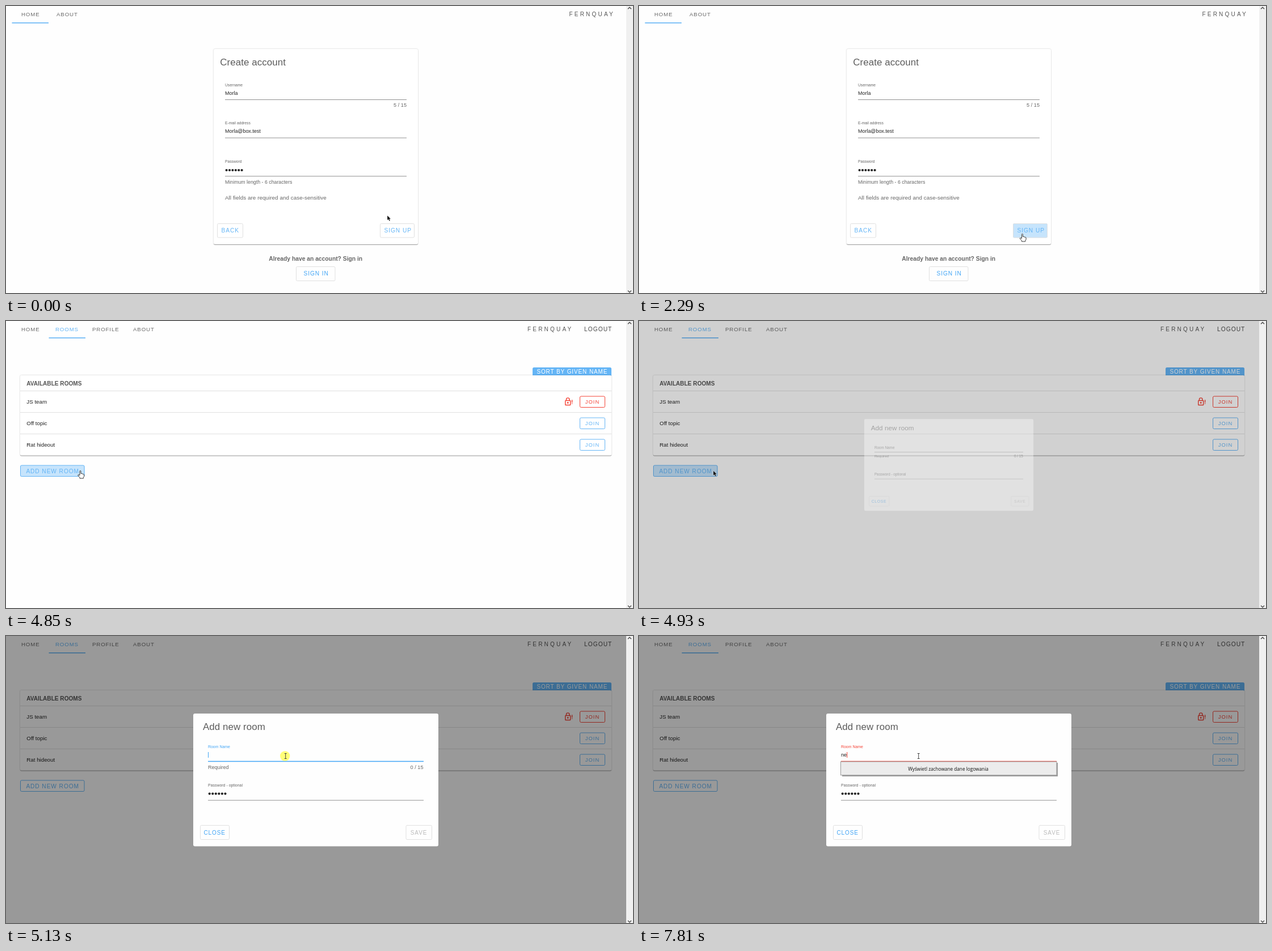
Recreate the animation shown at these times as an HTML page. Size 1105 px wide and 507 px high, loop 8000 ms.

```html
<!DOCTYPE html>
<html lang="en">
<head>
<meta charset="utf-8">
<title>Rooms demo</title>
<style>
  html, body { margin: 0; width: 100%; height: 100%; overflow: hidden; background: #fefefe; }
  svg { display: block; width: 1105px; height: 507px; font-family: "Liberation Sans", Arial, sans-serif; }
  text { white-space: pre; }
  .card { fill: #fff; filter: drop-shadow(0 1.2px .4px rgba(0,0,0,.3)) drop-shadow(0 .4px 1.2px rgba(0,0,0,.22)); }
</style>
</head>
<body>
<svg id="stage" viewBox="0 0 1105 507"></svg>
<script>
const LOOP = 8000;
const BLUE = '#64b5f6', DEEP = '#42a5f5', RED = '#f44336', GREY = '#666', EDGE = '#e0e0e0';
const stage = document.getElementById('stage');
const $ = id => document.getElementById(id);

// Markup helpers
const text = (x, y, str, size, fill = GREY, spacing = 0, extra = '') =>
  `<text x="${x}" y="${y}" font-size="${size}" fill="${fill}" letter-spacing="${spacing}" ${extra}>${str}</text>`;
const rect = (x, y, w, h, attrs) => `<rect x="${x}" y="${y}" width="${w}" height="${h}" ${attrs}/>`;
const rule = (x1, x2, y, color = '#919191', extra = '') =>
  `<path d="M${x1} ${y}H${x2}" stroke="${color}" ${extra}/>`;
const dots = (x, y, gap) => Array.from({ length: 6 }, (_, i) =>
  `<circle cx="${x + i * gap}" cy="${y}" r="2.1" fill="#222"/>`).join('');
const button = (x, y, w, h, label, tx, ty, color, edge = EDGE, size = 10.2, spacing = .91) =>
  rect(x + .5, y + .5, w - 1, h - 1, `rx="2" fill="none" stroke="${edge}"`) +
  text(tx, ty, label, size, color, spacing);
const ripple = (id, x, y, w, h, cx, cy) =>
  `<clipPath id="${id}Clip">${rect(x, y, w, h, 'rx="2.5"')}</clipPath>
   <g clip-path="url(#${id}Clip)"><circle id="${id}" cx="${cx}" cy="${cy}" r="0" fill="${BLUE}"/></g>`;
const tab = (x, label, id = '') => text(x, 18, label, 9.7, '#6c6c6c', .86, id && `id="${id}"`);
const brand = x => text(x, 18, 'FERNQUAY', 10, '#555', 3.2);

const nav = `
  ${tab(27, 'HOME')}
  <g id="guestNav">${tab(89, 'ABOUT')}${brand(992.5)}</g>
  <g id="memberNav">
    ${tab(87, 'ROOMS', 'roomsTab')}${tab(152, 'PROFILE')}${tab(224, 'ABOUT')}${brand(919)}
    ${text(1019, 18, 'LOGOUT', 10.2, '#484848', 1.05)}
  </g>
  ${rect(10.5, 29, 64.5, 1.6, `id="slider" fill="${BLUE}"`)}`;

const register = `<g id="register">
  ${rect(366, 76, 360, 345, 'rx="2.5" class="card"')}
  ${text(377.3, 105, 'Create account', 16.9, '#5c5c5c', .08)}
  ${text(386, 142, 'Username', 6.72)}
  ${text(386, 157, 'Morla', 8.95, '#222')}
  ${rule(386, 706, 165.5)}
  ${text(683, 178.3, '5 / 15', 9.2)}
  ${text(386, 209.2, 'E-mail address', 6.72)}
  ${text(386, 224.3, 'Morla@box.test', 8.95, '#222')}
  ${rule(386, 706, 233)}
  ${text(386, 277.2, 'Password', 6.72)}
  ${dots(388.6, 290, 5.4)}
  ${rule(386, 706, 300.7)}
  ${text(386, 313.6, 'Minimum length - 6 characters', 8.8)}
  ${text(386, 341.8, 'All fields are required and case-sensitive', 9.8, GREY, .07)}
  ${ripple('signUpRipple', 659, 384, 61, 25.5, 675.5, 403)}
  ${button(372, 384, 46, 25.5, 'BACK', 379.6, 400.3, BLUE)}
  ${button(659, 384, 61, 25.5, 'SIGN UP', 666.6, 400.3, BLUE)}
  ${text(463.3, 449.6, 'Already have an account? Sign in', 10.3, GREY, 0, 'font-weight="bold"')}
  ${button(511, 460, 69.5, 26, 'SIGN IN', 524.5, 476.2, DEEP)}
</g>`;

const roomRow = (y, name, color) =>
  rule(25, 1067, y, EDGE) + text(36.3, y + 22.4, name, 9.75, '#222') +
  button(1011, y + 9, 45, 20.5, 'JOIN', 1020.8, y + 22.8, color, color, 9.4, 1);
const lock = `<g fill="none" stroke="${RED}" stroke-width="1.4">
  <rect x="985.7" y="140.5" width="9" height="8" rx=".8"/>
  <path d="M987.4 140V138.7a2.8 2.8 0 0 1 5.6 0V140M997.6 139.2V144.2M997.6 145.2V146.6"/>
  <circle cx="990.2" cy="144.5" r=".7"/></g>`;
const rooms = `<g id="rooms">
  ${rect(928, 82, 139, 16, `rx="2.5" fill="${BLUE}"`)}
  ${text(935.4, 93.2, 'SORT BY GIVEN NAME', 10, '#fff', .89)}
  ${rect(25, 96, 1042, 141.5, 'rx="2" class="card"')}
  ${text(36.3, 113.6, 'AVAILABLE ROOMS', 10.1, '#555', 0, 'font-weight="bold"')}
  ${roomRow(123.5, 'JS team', RED)}${lock}
  ${roomRow(161.5, 'Off topic', BLUE)}
  ${roomRow(199.5, 'Rat hideout', BLUE)}
  ${ripple('addRipple', 25, 255, 113.5, 20, 131, 264)}
  ${button(25, 254.5, 113.5, 20.5, 'ADD NEW ROOM', 35.4, 268.7, BLUE, BLUE)}
</g>`;

const dialog = `<g id="dialog">
  ${rect(330, 137, 432, 234.5, 'rx="3" fill="#fefefe"')}
  ${text(347, 165.8, 'Add new room', 16.9, '#5c5c5c', .08)}
  ${text(356, 198, 'Room Name', 6.95, GREY, 0, 'id="nameLabel"')}
  ${text(356, 213.4, '', 9.2, '#222', 0, 'id="nameValue"')}
  ${rect(356, 205, 1, 10, 'id="caret"')}
  ${rule(356, 736, 221.5, GREY, 'id="nameLine"')}
  ${text(356, 235.2, 'Required', 9)}
  ${text(712.6, 235.2, '0 / 15', 9.2)}
  ${text(356, 266.3, 'Password - optional', 6.95, GREY, 0, 'id="passLabel"')}
  <g id="passDots">${dots(358.7, 278.6, 5.55)}</g>
  ${rule(356, 736, 290.2)}
  ${button(342, 334, 52, 26, 'CLOSE', 348.4, 350.6, DEEP, EDGE, 10, .9)}
  ${button(704.5, 334, 46.5, 26, 'SAVE', 712.8, 350.6, '#bbb', EDGE, 10, .9)}
  <g id="popup">
    ${rect(358, 224, 380, 24, 'fill="#999"')}
    ${rect(355.5, 222, 380.5, 23.8, 'fill="#ececec" stroke="#9a9a9a"')}
    <text x="545" y="238" font-size="8.25" text-anchor="middle" fill="#111"
      font-family="Open Sans, Noto Sans, sans-serif">Wyświetl zachowane dane logowania</text>
  </g>
</g>`;

const scrollbar = rect(1093, 0, 12, 507, 'fill="#f0f0f0"') +
  `<path d="M1096 5.3L1099 2.3L1102 5.3M1096 502.7L1099 505.7L1102 502.7" fill="none" stroke="#505050" stroke-width="1.5"/>`;

const pointer = `<g id="pointer">
  <path id="arrow" d="M0 0V8.6L2 6.8L3.5 10L5 9.3L3.6 6.2H6.2Z" stroke="#fff" stroke-width=".4"/>
  <path id="hand" d="M-1 8V1Q-1 0 0 0Q1 0 1 1V5Q3 4.4 3.2 5.6Q5 5 5.2 6.2Q6.6 6 6.6 7.3V10L5.4 12V13.5H-1V12L-4 8.6Q-4.6 7 -3 7.2Z"
    fill="#fff" stroke="#222" stroke-width=".9" stroke-linejoin="round"/>
  <g id="beam"><circle id="press" cx="-1" r="8.7" fill="#ffff78"/>
    <path d="M-2 -4.5H2M0 -4.5V4.5M-2 4.5H2" fill="none" stroke="#444"/></g>
</g>`;

stage.innerHTML = rect(0, 0, 1105, 507, 'fill="#fefefe"') + nav + register + rooms +
  rect(0, 0, 1093, 507, 'id="dim"') + dialog + scrollbar + pointer;

// Timing helpers
const clamp = v => Math.max(0, Math.min(1, v));
const span = (t, a, b) => clamp((t - a) / (b - a));
const ease = p => p * p * (3 - 2 * p);
const lerp = (a, b, p) => a + (b - a) * p;
const mix = (a, b, p) => `rgb(${a.map((v, i) => Math.round(lerp(v, b[i], p)))})`;
const set = (id, attrs) => { for (const k in attrs) $(id).setAttribute(k, attrs[k]); };
const show = (id, on) => { $(id).style.display = on ? '' : 'none'; };

const path = [ // time, x, y
  [0, 672, 370], [90, 672, 370], [250, 698, 411], [390, 698, 410], [600, 692, 394],
  [800, 679.5, 397.5], [1110, 679.5, 397.5], [1180, 675.5, 402.5], [2380, 675.5, 402.5],
  [2680, 541, 373], [2780, 541, 373], [2990, 530, 388], [3240, 530, 388], [3690, 472, 279],
  [4080, 776, 183], [4470, 131, 264.5], [5130, 131, 264.5]
];
function pointerAt(t) {
  if (t >= 5130) return [492.7, 212];
  const i = path.findIndex(p => p[0] > t);
  const [a, b] = [path[i - 1], path[i]], p = ease(span(t, a[0], b[0]));
  return [lerp(a[1], b[1], p), lerp(a[2], b[2], p)];
}
const inside = ([px, py], x, y, w, h) => px >= x && px <= x + w && py >= y && py <= y + h;

// Dialog opens in three hard stages.
function dialogStage(t) {
  if (t < 4930) return { open: 0, dim: 0, float: 0 };
  if (t < 5030) return { open: .38, dim: .45, float: 0 };
  if (t < 5130) return { open: .83, dim: .8, float: .43 };
  return { open: 1, dim: 1, float: 1 };
}

function drawDialog(t) {
  const { open, dim, float } = dialogStage(t);
  const scale = .5 + .5 * open;
  show('dim', dim > 0);
  show('dialog', open > 0);
  set('dim', { opacity: dim * .4 });
  set('dialog', { opacity: open, transform: `translate(546 254.3) scale(${scale}) translate(-546 -254.3)` });

  const size = lerp(9.2, 6.95, float), error = span(t, 6780, 7020);
  const accent = error ? mix([66, 165, 245], [244, 67, 54], error) : mix([102, 102, 102], [66, 165, 245], float);
  set('nameLabel', { y: lerp(212.8, 198, float), 'font-size': size, fill: accent });
  set('passLabel', { y: lerp(281, 266.3, float), 'font-size': size });
  set('nameLine', { stroke: float < 1 ? '#777' : accent, 'stroke-width': float < 1 ? 1 : 1.5 });
  show('passDots', float > 0);

  const typed = t < 6780 ? '' : t < 7290 ? 'n' : 'ne';
  if ($('nameValue').textContent !== typed) $('nameValue').textContent = typed;
  set('caret', { x: 356 + typed.length * 5.1, fill: accent });
  show('caret', float > 0 && !(t >= 5670 && t < 6220) && !(t >= 7400 && t < 7810));
  show('popup', t >= 6780);
}

function drawPointer(t) {
  const pos = pointerAt(t), typing = t >= 5130;
  const overButton = t < 3240 ? inside(pos, 659, 384, 61, 25.5) : t < 4930 && inside(pos, 25, 255, 113, 20);
  set('pointer', { transform: `translate(${pos})` });
  show('beam', typing);
  show('hand', overButton && !typing);
  show('arrow', !overButton && !typing);
  show('press', t < 5290);
}

function draw(t) {
  const signedUp = t >= 2780, inRooms = t >= 3240;
  show('guestNav', !signedUp);
  show('memberNav', signedUp);
  show('register', !inRooms);
  show('rooms', inRooms);
  set('roomsTab', { fill: inRooms ? BLUE : '#6c6c6c' });
  set('slider', { x: lerp(10.5, 75.5, ease(span(t, 3240, 3540))) });
  set('signUpRipple', { r: 65 * ease(span(t, 1910, 2210)), opacity: .37 * (1 - span(t, 2380, 2680)) });
  set('addRipple', { r: 115 * ease(span(t, 4550, 4850)), opacity: t < 5130 ? .37 : 0 });
  drawDialog(t);
  drawPointer(t);
}

const start = performance.now();
function tick() {
  draw((performance.now() - start) % LOOP);
  requestAnimationFrame(tick);
}
tick();
</script>
</body>
</html>
```
